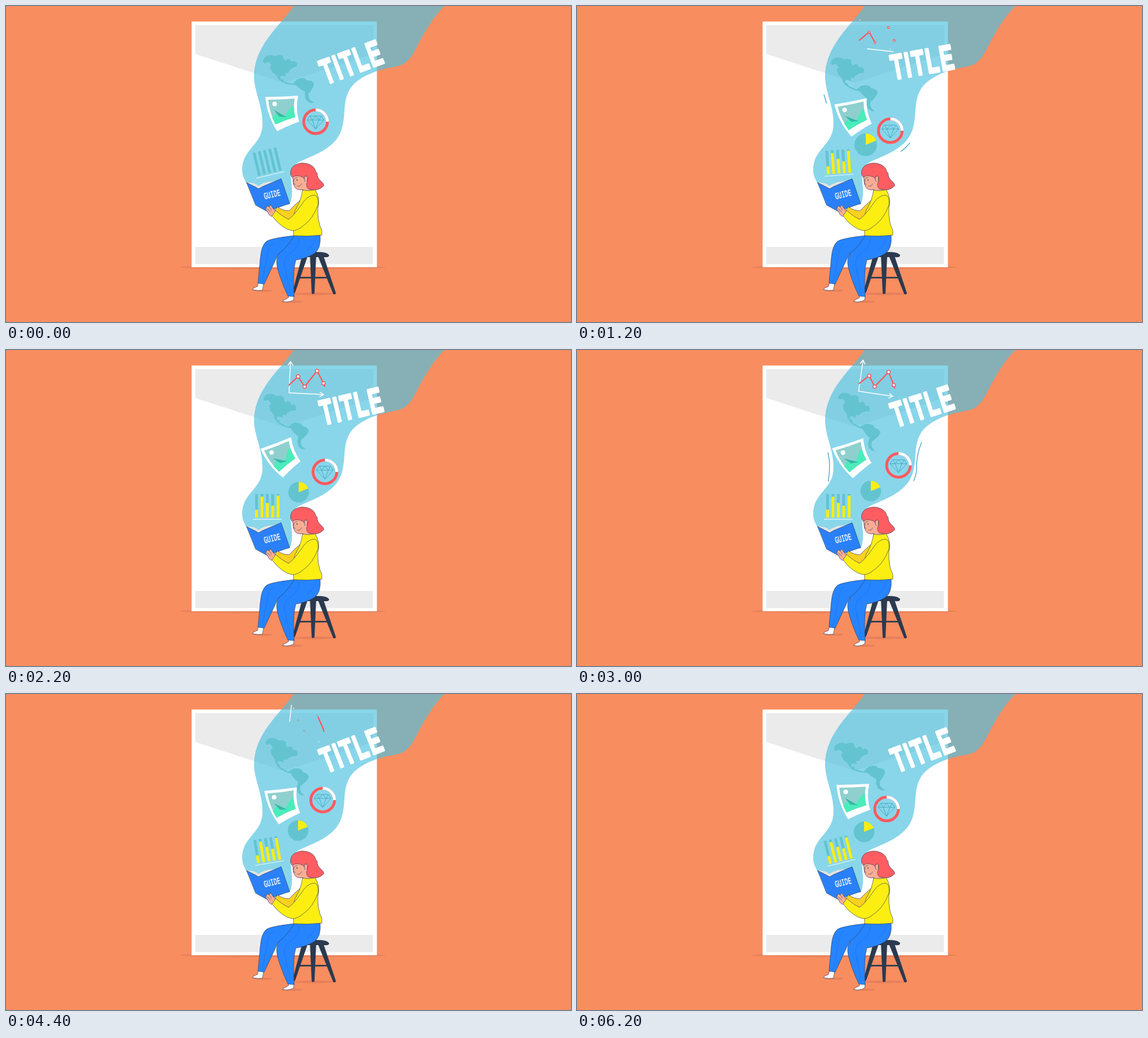
Write an HTML page that moves like this. It is 1000 px wide and 560 px high and loops after 6300 ms.

```html
<!DOCTYPE html>
<html lang="en">
<head>
<meta charset="utf-8">
<title>Reading a guide</title>
<style>
  html, body { margin: 0; width: 100%; height: 100%; overflow: hidden; background: #f88d60; }
  svg { display: block; width: 100%; height: 100%; }
  .teal { fill: #63c4cf; }
  .yellow { fill: #fdee12; }
  .dark { fill: #2b3a4f; }
  .ink { stroke: #33405e; stroke-width: .7; stroke-linejoin: round; stroke-linecap: round; }
  .line { fill: none; }
  .pants { fill: #2684ff; }
  .fold { fill: none; stroke: #1f6fdc; stroke-width: .6; }
  .skin { fill: #fbad93; }
  .shade { fill: #e5805a; }
  .swish { fill: none; stroke: #3f9fc6; stroke-width: 1.3; }
  .axis { fill: none; stroke: #fff; stroke-width: 1.5; }
  .title { font: bold 62px "Liberation Sans", Arial, sans-serif; letter-spacing: 5px; fill: #fff; stroke: #fff;
    stroke-width: 4; stroke-linejoin: round; text-anchor: middle; }
  .guide { font: 600 16px "Noto Sans Mono", "DejaVu Sans Mono", monospace; fill: #e4efff; text-anchor: middle; }
</style>
</head>
<body>
<svg viewBox="0 0 1000 560" preserveAspectRatio="none">
  <rect width="1000" height="560" fill="#f88d60"/>

  <!-- poster -->
  <ellipse class="shade" cx="490" cy="463" rx="183" ry="3"/>
  <rect x="328.500" y="27.500" width="328" height="435.500" fill="#fff"/>
  <path d="M335 34H650V85L492 136L335 85Z" fill="#ebebeb"/>
  <rect x="335" y="427" width="314.500" height="30.500" fill="#ebebeb"/>

  <!-- stream from the book -->
  <path fill="#4fc2e0" fill-opacity=".67" d="M509 0C488 33 439 68 439 126C440 154 454 176 454 208
    C454 248 418 252 418 290C418 300 422 308 427 316L445 350L501 352Q507 346 506 322C504 300 500 286 519 276
    C562 258 592 245 597 205C601 185 596 161 614 140C633 121 662 112 688 108C717 103 722 80 733 61C744 42 757 18 776 0Z"/>

  <g id="map">
    <path class="teal" d="M455 99Q455 91 463 88Q470 85 476 89L483 86.500L490 88L491 94L495 97L498 94Q504 93 505 99L510 97
      L515 101L515 107L508 109L502 114L499 119L494 119L495 125L491 124L486 124L485 129L490 130L492 134L499 136
      L507 138L515 130L521 128L529 128L533 132Q541 131 545 137Q545 143 541 148L538 153L535 156L536 163L540 168L546 171
      L540 172L533 169L529 161L529 151Q523 149 516 143L513 140L506 140L496 138L487 134L481 128L478 122L471 117L467 109
      L470 104L464 99L457 102Z"/>
  </g>

  <g id="photo">
    <path fill="#fff" d="M459 161Q488 161 517 159Q512 182 519 205Q499 212 480 222Q462 194 459 161Z"/>
    <path fill="#8fd0cf" d="M464 166Q488 166 511 164Q508 182 512 197Q494 202 477 210Q466 188 464 166Z"/>
    <path fill="#4aecba" d="M471 198L479 190L493 195L506 177L509.500 178Q509 188 512 197Q494 202 477 210Z"/>
    <path fill="#35b8a6" d="M474 184L497 197L484 196Z"/>
    <circle cx="475.500" cy="173.500" r="4" fill="#fff"/>
  </g>

  <g id="ring" fill="none">
    <circle r="21" stroke="#ff5a5f" stroke-width="5"/>
    <path d="M0-21A21 21 0 0 1 21 0" stroke="#fff" stroke-width="5"/>
    <path d="M-10-10H10L15-3L0 13L-15-3ZM-15-3H15M-10-10L-6-3L0 13L6-3L10-10M-6-3L0-10L6-3" stroke="#46acc3" stroke-width="1" stroke-linejoin="round"/>
  </g>

  <g id="pie">
    <circle class="teal" r="18.300"/>
    <path class="yellow" d="M0 0V-18.300A18.300 18.300 0 0 1 17-6.800Z"/>
  </g>

  <g id="bars">
    <path d="M437 300H488" stroke="#d9f2f8" stroke-width="1.300"/>
  </g>

  <g id="chart">
    <path class="axis" id="axis" pathLength="1" d="M562 79L501 76L503.500 21"/>
    <path class="axis" id="tipX" pathLength="1" d="M555.500 74.500L562 79L555 83"/>
    <path class="axis" id="tipY" pathLength="1" d="M499 27L503.500 20.500L508 27.500"/>
    <path id="trend" pathLength="1" d="M500 63L517 47L528.500 65L550.500 37L562 59L564 65" fill="none" stroke="#f9565c" stroke-width="2.200"/>
    <g id="dots" fill="#fff" stroke="#f9565c" stroke-width="1.500"></g>
  </g>

  <g id="title"><text class="title" transform="scale(.58 1)" x="2.500" y="21.500">TITLE</text></g>

  <path class="swish" id="left" pathLength="1" d="M437 157Q447 187 447 205Q447 222 444 236"/>
  <path class="swish" id="right" pathLength="1" d="M573 258Q598 240 601 214Q600 182 612 160"/>

  <!-- stool -->
  <ellipse class="shade" cx="546" cy="510" rx="37" ry="2.500"/>
  <ellipse class="shade" cx="455" cy="504.500" rx="17" ry="2"/>
  <ellipse class="shade" cx="508" cy="524" rx="19" ry="2"/>
  <path class="dark" d="M524 443H534L512 507Q509 511 507 507ZM538 443H549L546 509Q543.500 512 541 509Z
    M552 443H562L584 509Q582 513 579 510ZM516 480H572V482.800H516Z"/>
  <path class="dark" d="M518 444Q520 436 536 436H557Q570 437 572 442Q571 446 564 445H520Z"/>

  <!-- legs -->
  <path class="ink" fill="#fff" d="M447 490L445 497Q437 500 436 502.500Q445 505 454 503.500L456 491Z"/>
  <path class="ink pants" d="M511 407Q471 411 461 417Q452 424 450 448L446 491L457 493L481 441L515 435Z"/>
  <path class="fold" d="M474 420Q464 425 462 446L453 490"/>
  <path class="ink" fill="#fff" d="M500 513L500 517Q493 520 489 523.500Q500 526 509 521L510 513Z"/>
  <path class="ink pants" d="M510 407Q500 425 484 438Q477 446 480 463Q488 492 499 514L510 515Q507 470 513 450Q530 448 545 439Q558 431 556 406Z"/>
  <path class="fold" d="M519 411Q518 428 503 438Q490 445 494 465L504 513M548 410Q546 424 534 431"/>

  <!-- book -->
  <path fill="#e4e4e4" d="M427 313Q440 312 447 319Q458 311 470 311Q481 310 487 306L489 313L448 333L431 320Z"/>
  <path class="ink" fill="#2a80f8" d="M426 313L442 321L447 324L454 320L487 306L502 350L462 364L442 353Z"/>
  <g transform="translate(471 334) rotate(-14)"><text class="guide" transform="scale(.62 1)" y="5.500">GUIDE</text></g>

  <!-- reader -->
  <path class="ink" fill="#fbd01f" d="M480 356Q491 363 501 363Q510 353 521 344L519 372Q506 379 493 378L475 366Z"/>
  <path class="ink skin" d="M508 299Q507 312 510 319Q513 326 521 326L525 325L525 332H547L540 318V296Z"/>
  <path class="ink yellow" d="M525 326Q536 329 547 325Q557 342 552 358Q551 382 559 398L559 406Q534 409 509 407Q508 390 511 379Q507 370 514 358Q522 345 525 326Z"/>
  <path class="ink yellow" d="M476 361Q490 374 500 378Q509 372 521 355Q533 335 546 335Q554 337 552 353Q543 377 528 388Q515 399 507 398Q489 396 470 371Z"/>
  <path class="ink skin" d="M461 356Q462 353 466 356L467 353Q469 352 472 358L477 363L470 373Q464 370 463 364Q457 361 461 356Z"/>
  <path class="ink line" d="M466 356L470 362M461 358L468 365"/>
  <path class="ink" fill="#ff5d62" d="M504 299Q502 288 511 282Q524 275 538 281Q547 286 548 293L551 297Q550 303 556 309Q564 316 562 319Q551 330 535 324Q530 319 533 312Q536 303 530 301L528 306Q525 302 518 301Q510 300 507 304Z"/>
  <path class="ink skin" d="M529 311Q526 302 531 301Q535 302 533 310"/>
  <circle cx="515" cy="308.500" r="1.100" fill="#33405e"/>
  <path class="ink line" d="M510 306L508.500 315L512 316M516 319Q521 321 523 315M512 305L515 304"/>
</svg>
<script>
const LOOP = 6300;
const TIMES = [0, 1200, 2200, 3000, 4400, 5300];
const $ = id => document.getElementById(id);
const clamp = u => Math.min(1, Math.max(0, u));
const span = (t, from, to) => clamp((t - from) / (to - from));
const smooth = u => u * u * (3 - 2 * u);
const backOut = u => 1 + 2.7 * (u - 1) ** 3 + 1.7 * (u - 1) ** 2;

// Icon poses at TIMES, turning about the pivot.
const poses = {
  map:   { pivot: [498, 132], x: [498, 486.5, 491, 493.5, 492, 494.5], y: [132, 140.5, 128, 128, 129.5, 127], r: [0, 9, 11.7, 16.8, 15.3, 4.3] },
  photo: { pivot: [487.5, 160], x: [487.5, 483.5, 477, 478.5, 485.5, 488], y: [160, 169, 165, 165.5, 168.5, 166], r: [0, -9, -19, -16, -4.5, -1] },
  ring:  { x: [548, 554.5, 564.5, 569, 560.5, 552], y: [205, 221, 216, 204.5, 188, 194] },
  pie:   { x: [508, 511, 518, 520, 517, 511.5], y: [244.5, 246, 252, 250, 242, 243] },
  bars:  { pivot: [462, 277], r: [-13.5, -4, 0, 0, -9.5, -13] },
  chart: { pivot: [530, 48], r: [3, 3.5, 0, 5.7, 3.5, 3] },
  title: { at: [611, 99.5], r: [-20.5, -10.3, -13, -17.8, -21.5, -22] }
};

// Smooth periodic curve through the values at TIMES.
function track(values, t) {
  const n = TIMES.length;
  const time = i => TIMES[(i + n) % n] + LOOP * Math.floor(i / n);
  const value = i => values[(i + n) % n];
  const slope = i => (value(i + 1) - value(i - 1)) / (time(i + 1) - time(i - 1));
  let i = n - 1;
  while (TIMES[i] > t) i--;
  const d = time(i + 1) - time(i), u = (t - time(i)) / d, k = smooth(u);
  return value(i) * (1 - k) + value(i + 1) * k
    + d * u * (1 - u) * (slope(i) * (1 - u) - slope(i + 1) * u);
}

function place(id, t, scale = 1) {
  const p = poses[id], [px, py] = p.pivot || [0, 0], [ax, ay] = p.at || [px, py];
  const x = p.x ? track(p.x, t) : ax, y = p.y ? track(p.y, t) : ay, r = p.r ? track(p.r, t) : 0;
  $(id).setAttribute('transform', `translate(${x} ${y}) rotate(${r}) scale(${scale}) translate(${-px} ${-py})`);
}

function trim(id, from, to) {
  const el = $(id);
  el.style.display = to - from > .001 ? '' : 'none';
  el.style.strokeDasharray = to - from > .999 ? 'none' : `${to - from} 2`;
  el.style.strokeDashoffset = -from;
}

function add(parent, name, attrs) {
  const el = document.createElementNS(parent.namespaceURI, name);
  for (const key in attrs) el.setAttribute(key, attrs[key]);
  return parent.appendChild(el);
}

const fills = [14, 37, 26, 21, 39].map((height, i) => {
  const x = 441 + i * 9.5;
  add($('bars'), 'rect', { class: 'teal', x, y: 255, width: 5, height: 42 });
  return { height, el: add($('bars'), 'rect', { class: 'yellow', x, width: 5 }) };
});

const dots = [[517, 47], [528.5, 65], [550.5, 37], [562, 59]].map(([cx, cy]) =>
  add($('dots'), 'circle', { cx, cy }));

function draw(t) {
  for (const id in poses) place(id, t, id === 'pie' ? (t < 700 ? 0 : backOut(span(t, 700, 1500))) : 1);

  fills.forEach(({ height, el }, i) => {
    const u = span(t, 250 + i * 60, 950 + i * 60), h = height * (1 - (1 - u) ** 3);
    el.setAttribute('y', 297 - h);
    el.setAttribute('height', h);
  });

  const drawn = smooth(span(t, 700, 1850)), gone = smooth(span(t, 3880, 4660));
  trim('axis', gone, drawn);
  trim('trend', gone, drawn);
  for (const tip of ['tipX', 'tipY']) trim(tip, span(t, 3900, 4450), span(t, 1150, 1700));
  const size = 3 * Math.min(smooth(span(t, 800, 1550)), 1 - smooth(span(t, 3900, 4520)));
  dots.forEach(dot => dot.setAttribute('r', size));
  $('dots').style.opacity = size > .05 ? 1 : 0;

  const start = [4874, 2472, 1026].find(s => t >= s);
  const age = start ? t - start : 0;
  const head = smooth(span(age, 0, 600)), tail = smooth(span(age, 164, 1135));
  trim('left', tail, head);
  trim('right', tail, head);
}

function tick(now) {
  draw(now % LOOP);
  requestAnimationFrame(tick);
}
draw(0);
requestAnimationFrame(tick);
</script>
</body>
</html>
```
